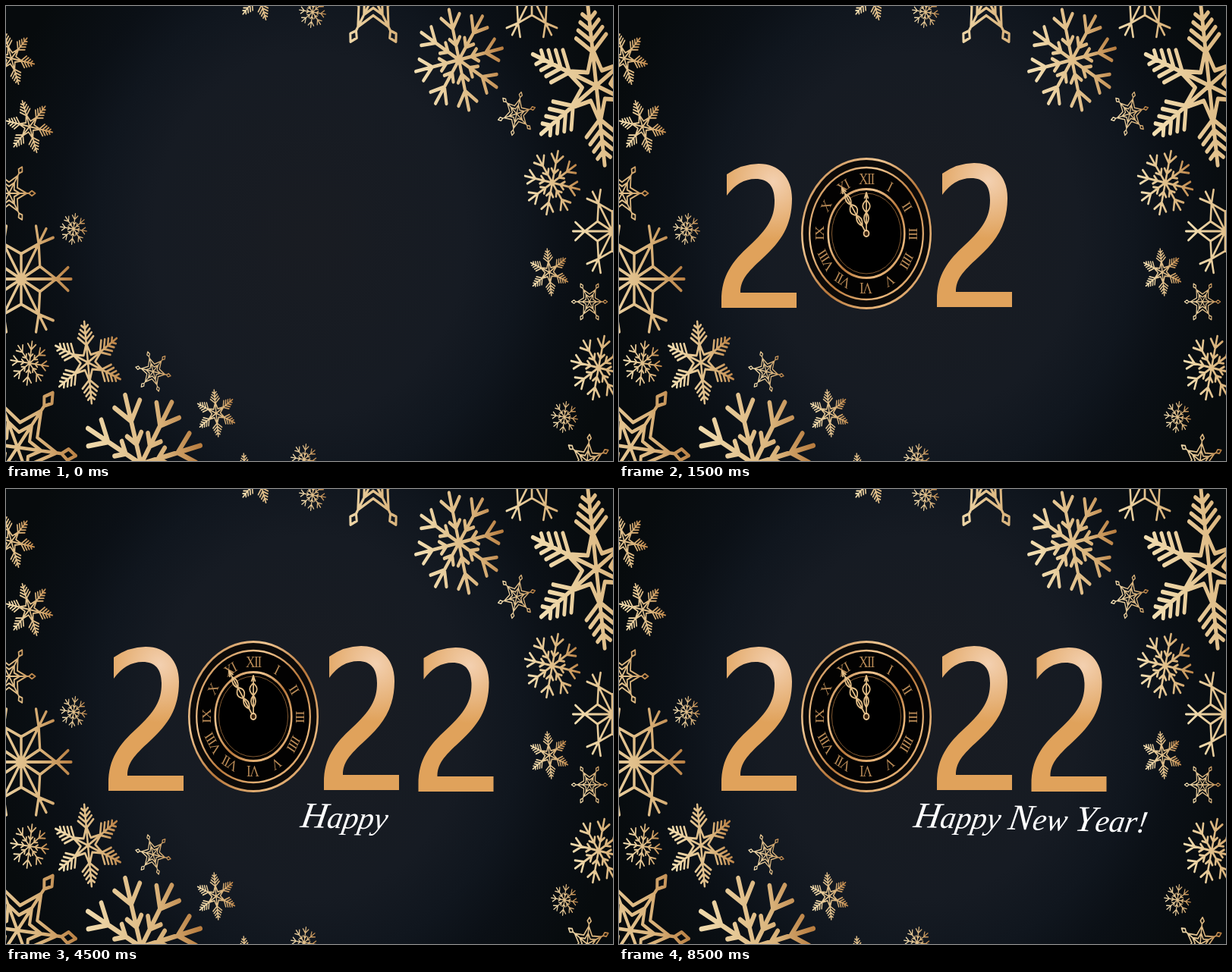
These frames come from a looping animation (800x600 px, 9 s). An HTML page:

```html
<!DOCTYPE html>
<html lang="en">
<head>
<meta charset="utf-8">
<title>Happy New Year</title>
<style>
  html, body { margin: 0; width: 100%; height: 100%; overflow: hidden; background: #0a0e12; }
  svg { display: block; width: 100vw; height: 100vh; }
  .flake { fill: none; stroke: url(#flakeGold); stroke-linecap: round; stroke-linejoin: round; }
  .numeral { font: 20px "Liberation Serif", "Noto Serif", serif; letter-spacing: -1.5px; fill: #b98a56; text-anchor: middle; }
  .hand { fill: none; stroke: #e3bd86; stroke-width: 2; stroke-linejoin: round; }
  .greeting { font: italic 41px "Liberation Serif", "Noto Serif", serif; fill: #fff; }
  .capital { font-size: 48px; }
</style>
</head>
<body>
<svg viewBox="0 0 800 600" preserveAspectRatio="none">
  <defs>
    <radialGradient id="night" gradientUnits="userSpaceOnUse" r="430" gradientTransform="translate(400 300) scale(1 1.16)" cx="0" cy="0">
      <stop offset="0" stop-color="#191c22"/>
      <stop offset=".48" stop-color="#161b23"/>
      <stop offset=".65" stop-color="#10161e"/>
      <stop offset=".78" stop-color="#0b1016"/>
      <stop offset="1" stop-color="#070b0d"/>
    </radialGradient>
    <linearGradient id="flakeGold" x1="0" y1=".6" x2="1" y2=".4">
      <stop offset="0" stop-color="#f3e0b4"/>
      <stop offset=".7" stop-color="#d9b27a"/>
      <stop offset="1" stop-color="#b87d40"/>
    </linearGradient>
    <radialGradient id="digitGold" gradientUnits="userSpaceOnUse" cx="203" cy="232" r="76">
      <stop offset="0" stop-color="#f3d0b0"/>
      <stop offset="1" stop-color="#e0a25b"/>
    </radialGradient>
    <linearGradient id="ringGold" x1="0" y1="0" x2="1" y2="1" spreadMethod="reflect">
      <stop offset="0" stop-color="#bb7c40"/>
      <stop offset=".3" stop-color="#efc591"/>
      <stop offset=".55" stop-color="#b9783c"/>
      <stop offset=".8" stop-color="#e9b77c"/>
      <stop offset="1" stop-color="#b9783c"/>
    </linearGradient>
    <path id="two" fill="url(#digitGold)" d="M142 222Q162 208 184 208C211 208 228 226 228 254C228 290 213 311 190 332C168 352 160 362 160 378H234V398H135V388C135 356 149 337 172 316C196 294 205 279 205 257C205 238 197 228 180 228Q158 228 142 250Z"/>
  </defs>
  <rect width="800" height="600" fill="url(#night)"/>
  <g id="flakes"></g>
  <g id="scene"></g>
</svg>
<script>
const STEP = 500, LOOP = 9000, ASPECT = 0.86;
const flakes = document.getElementById('flakes');
const scene = document.getElementById('scene');
const reveal = [];

function add(parent, name, attrs = {}, text = '') {
  const node = document.createElementNS('http://www.w3.org/2000/svg', name);
  for (const key in attrs) node.setAttribute(key, attrs[key]);
  node.textContent = text;
  return parent.appendChild(node);
}

// Arms have length 1; lines are [across, along] points, mirrored on each arm.
const spine = [[0, 0], [0, 0.97]];
const twig = (along, length, lean = 40) => {
  const a = lean * Math.PI / 180;
  return [[0, along], [length * Math.sin(a), along + length * Math.cos(a)]];
};
const star = (tip, valley) => [[0, tip], [valley / 2, valley * Math.sqrt(3) / 2]];

const branch = { arms: 8, width: 0.068, lines: [spine, twig(0.6, 0.32), twig(0.28, 0.18)] };
const fern = { arms: 6, width: 0.052, lines: [spine, star(0.45, 0.2), ...[0, 1, 2, 3].map(i => twig(0.8 - i * 0.13, 0.12 + i * 0.055, 48))] };
const jewel = { arms: 6, width: 0.05, lines: [[[0, 0], [0, 0.74]], [[0, 0.74], [0.08, 0.85], [0, 0.98]], star(0.66, 0.36), star(0.4, 0.22)] };
const lattice = { arms: 6, width: 0.048, lines: [spine, twig(0.68, 0.3), star(0.68, 0.42), [[0, 0], [0.21, 0.36]]] };

function flakePath({ arms, lines }, radius, tilt) {
  let d = '';
  for (let k = 0; k < arms; k++) {
    const angle = tilt * Math.PI / 180 + k * 2 * Math.PI / arms;
    const s = Math.sin(angle) * radius, c = Math.cos(angle) * radius;
    for (const side of [-1, 1]) for (const line of lines)
      d += 'M' + line.map(([x, y]) => `${side * x * c + y * s} ${side * x * s - y * c}`).join('L');
  }
  return d;
}

function scatter(kind, radius, tilt, ...centres) {
  const d = flakePath(kind, radius, tilt);
  for (const [x, y] of centres)
    add(flakes, 'path', { class: 'flake', d, 'stroke-width': kind.width * radius,
      transform: `translate(${x} ${y}) scale(${ASPECT} 1)` });
}

scatter(branch, 97, -15, [178, 604]);
scatter(branch, 70, -13, [597, 71]);
scatter(branch, 44, 12, [720, 233], [781, 477]);
scatter(branch, 30, 8, [31, 471]);
scatter(branch, 21, 8, [89, 294], [736, 542], [404, 8], [393, 598]);
scatter(fern, 109, -7, [778, 105]);
scatter(fern, 56, -6, [108, 470]);
scatter(fern, 37, -18, [31, 159], [7, 69], [333, -16]);
scatter(fern, 32, -6, [277, 537], [716, 351], [316, 621]);
scatter(jewel, 92, 37, [15, 582]);
scatter(jewel, 71, 30, [484, -13]);
scatter(jewel, 41, 30, [4, 247]);
scatter(jewel, 36, 6, [766, 600]);
scatter(jewel, 30, 14, [673, 142]);
scatter(jewel, 28, -18, [194, 482]);
scatter(jewel, 28, 30, [769, 390]);
scatter(lattice, 79, 30, [20, 360]);
scatter(lattice, 62, 30, [799, 297], [693, -14]);

function show(part) {
  reveal.push(part);
  return part;
}

const addDigit = (dx, dy) => show(add(scene, 'use', { href: '#two', x: dx, y: dy }));

function addHand(length, angle, beads) {
  let d = `M0-4V${-length}m-3 8l3-8l3 8`;
  const size = (length - 22) / beads;
  for (let i = 0; i < beads; i++) {
    const y = -12 - i * size, w = i % 2 ? 11 : 7;
    d += `M0 ${y}Q${-w} ${y - size / 2} 0 ${y - size}Q${w} ${y - size / 2} 0 ${y}`;
  }
  return { class: 'hand', d, transform: `rotate(${angle})` };
}

function addClock() {
  const face = show(add(scene, 'g', { transform: `translate(326 300) scale(${ASPECT} 1)` }));
  const ring = (r, width, stroke, fill = 'none') => add(face, 'circle', { r, stroke, fill, 'stroke-width': width });
  ring(98.5, 3, 'url(#ringGold)', '#0c0a09');
  ring(87, 2.6, 'url(#ringGold)', '#030202');
  ring(58.5, 3, 'url(#ringGold)', '#000');
  ring(53, 1, '#8a5f35');
  'XII I II III IIII V VI VII VIII IX X XI'.split(' ').forEach((label, i) =>
    add(face, 'text', { class: 'numeral', y: -65, transform: `rotate(${i * 30})` }, label));
  add(face, 'path', addHand(54, 0, 2));
  add(face, 'path', addHand(71, -32, 3));
  ring(4, 2, '#f0c995', '#3a2410');
}

function addGreeting(words) {
  const line = add(scene, 'text', { class: 'greeting', transform: 'translate(387 446) rotate(1.3) skewX(-8)' });
  for (const char of words) {
    const glyph = add(line, 'tspan', /[A-Z]/.test(char) ? { class: 'capital' } : {}, char);
    if (char === ' ') glyph.style.whiteSpace = 'pre';
    else show(glyph);
  }
}

addDigit(0, 0);
addClock();
addDigit(284, -1);
addDigit(408.5, 1);
addGreeting('Happy New Year!');

function draw() {
  const step = Math.floor(performance.now() % LOOP / STEP);
  reveal.forEach((part, i) => { part.style.visibility = i < step ? 'visible' : 'hidden'; });
  requestAnimationFrame(draw);
}
draw();
</script>
</body>
</html>
```
